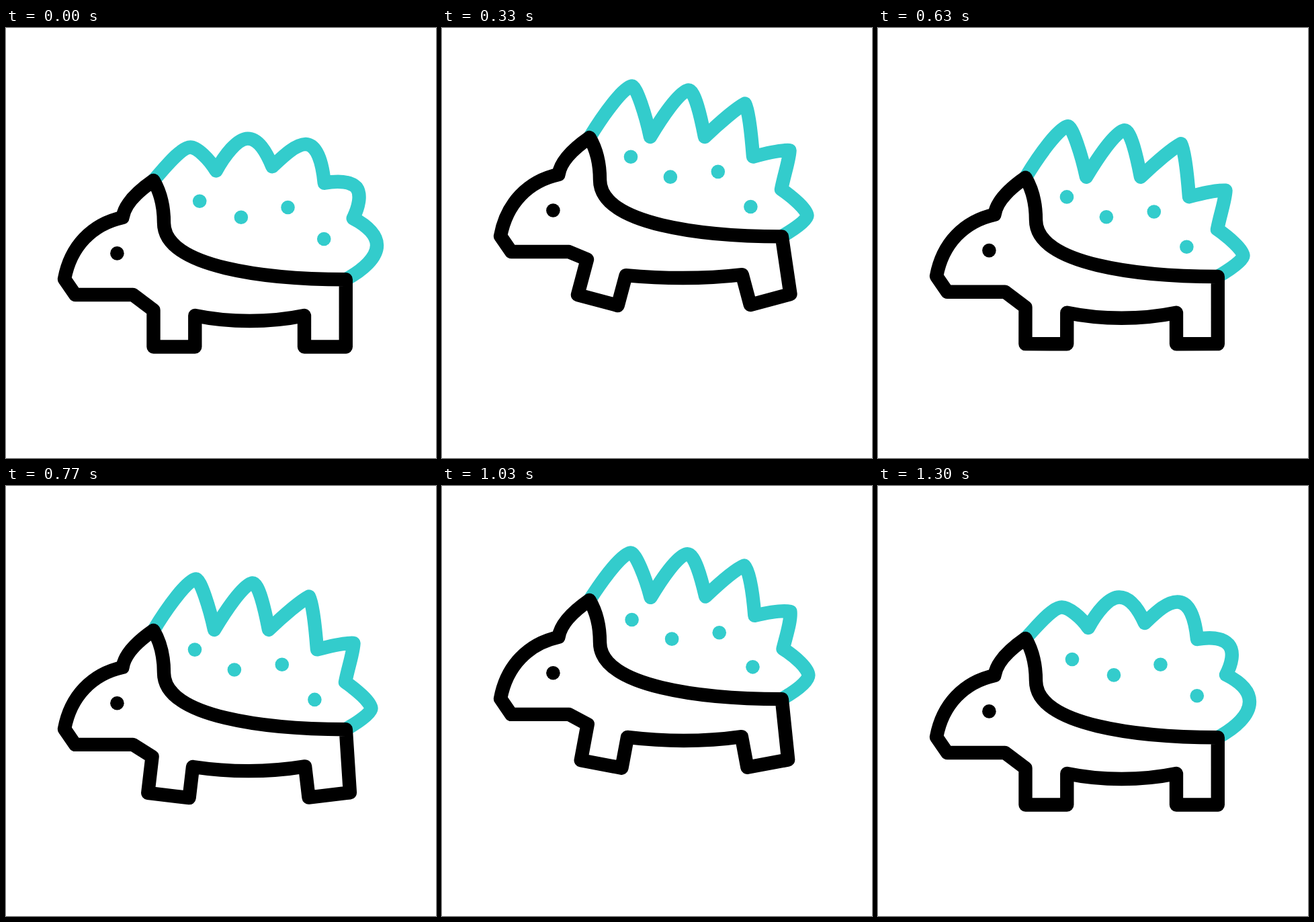
Animation, 640 px wide and 640 px high, one loop 1.67 s. Source, as an HTML page:

```html
<!DOCTYPE html>
<html lang="en">
<head>
<meta charset="utf-8">
<title>Hopping dinosaur</title>
<style>
  html, body { margin: 0; width: 100%; height: 100%; overflow: hidden; background: #fff; }
  svg { display: block; width: 100%; height: 100%; }
  path { fill: none; stroke-width: 20.4; stroke-linecap: round; stroke-linejoin: round; }
</style>
</head>
<body>
<svg viewBox="0 0 640 640">
  <g id="dino">
    <g fill="#33cccc" id="dots"></g>
    <path id="spikes" stroke="#33cccc"/>
    <path id="body" stroke="#000"/>
    <circle cx="165.4" cy="335.4" r="10.3"/>
  </g>
</svg>
<script>
const LOOP = 1670, LAST = 39, HOP = 66.5, SWING = 15;
const $ = id => document.getElementById(id);
const clamp = x => Math.min(1, Math.max(0, x));
const mix = (a, b, k) => a + (b - a) * k;

// Spike outline and dots, relaxed and raised
const LOW = `M219.5 227 C235 211 259 180.5 273.5 180.5 C284 180.5 303 196 313 211
  C325 189 343 165.5 359 165.5 C375 165.5 387 182 397 204
  C412 190 429 172.5 445.5 172.5 C464 172.5 472 198 475 228
  C498 224 514.3 227.4 522 236.2 C531 247 526 266 518 281
  C542 293 553 307 553 321 C553 341 532 360 506 374`;
const HIGH = `M219.5 227 C240 193 271 150.5 283 150.5 C289 150.5 303 193 310 226
  C325 201 354 156.5 367 156.5 C376 156.5 385 195 391 226
  C413 205 439 183 451 176.5 C456 186 460 217 463 255.5
  C480 251 505 245 517.5 246 C517 260 509 283 505 304
  C521 315 543.5 334 543.5 343.5 C543.5 350 525 363 506 374`;
const DOTS = [
  [289, 258, 281, 255.7], [351, 281.4, 339.9, 285.6],
  [420.5, 265.8, 410.8, 277.8], [474.8, 312.3, 459.4, 330]
];

const highNums = HIGH.match(/[\d.]+/g).map(Number);
function morph(k) {
  let i = 0;
  return LOW.replace(/[\d.]+/g, n => mix(+n, highNums[i++], k).toFixed(2));
}

const dots = DOTS.map(() => {
  const c = document.createElementNS('http://www.w3.org/2000/svg', 'circle');
  c.setAttribute('r', 10.3);
  return $('dots').appendChild(c);
});

// Cubic ease-in-out with handles at .42 and .58
function ease(x) {
  let lo = 0, hi = 1;
  for (let i = 0; i < 20; i++) {
    const u = (lo + hi) / 2, v = 1 - u;
    if (1.26 * u * v * v + 1.74 * u * u * v + u * u * u < x) lo = u; else hi = u;
  }
  return lo * lo * (3 - 2 * lo);
}

// Alternates 0, 1, 0, 1, 0 at the given key positions
function wave(keys, f) {
  if (f <= keys[0]) return 0;
  for (let i = 1; i < keys.length; i++) {
    if (f < keys[i]) {
      const e = ease((f - keys[i - 1]) / (keys[i] - keys[i - 1]));
      return i % 2 ? e : 1 - e;
    }
  }
  return 0;
}

function turner(px, py, deg) {
  const a = deg * Math.PI / 180, c = Math.cos(a), s = Math.sin(a);
  return (x, y) => {
    const dx = x - px, dy = y - py;
    return (px + dx * c - dy * s).toFixed(2) + ' ' + (py + dx * s + dy * c).toFixed(2);
  };
}

function bodyPath(swing) {
  const front = turner(262, 401, SWING * swing);
  const rear = turner(457, 419, -SWING * swing);
  const belly = 438.7 - 1.3 * swing;
  return `M87 373.7 L103 397 H189 L${front(219.5, 420)} L${front(219.5, 474.5)}
    L${front(281.3, 474.5)} L${front(281.3, 428)}
    C333 ${belly} 392 ${belly} ${rear(444, 428)}
    L${rear(444, 474.5)} L${rear(505.8, 474.5)} L505.8 374.3
    C390 374.3 235 357 235 290 C235 266 229 243 219.5 227
    C205 237 177 258 173.5 282 C128 292 96 325 87 373.7 Z`;
}

function draw(t) {
  const tick = Math.floor((10 * Math.floor(t / 10) + 4) * 0.03);
  const f = Math.min(LAST, tick);
  const hop = wave([1.3, 11.4, 20.65, 28.6, 37.8], f);
  const swing = wave([0, 10.2, 18.6, 28, 36], f);
  const rise = clamp(Math.min((f + 1) / 10, (LAST - f) / 10));

  $('dino').setAttribute('transform', `translate(0 ${(-HOP * hop).toFixed(2)})`);
  $('body').setAttribute('d', bodyPath(swing));
  $('spikes').setAttribute('d', morph(rise));
  DOTS.forEach(([x0, y0, x1, y1], i) => {
    dots[i].setAttribute('cx', mix(x0, x1, rise));
    dots[i].setAttribute('cy', mix(y0, y1, rise));
  });
}

const start = performance.now();
function loop() {
  draw((performance.now() - start) % LOOP);
  requestAnimationFrame(loop);
}
loop();
</script>
</body>
</html>
```
